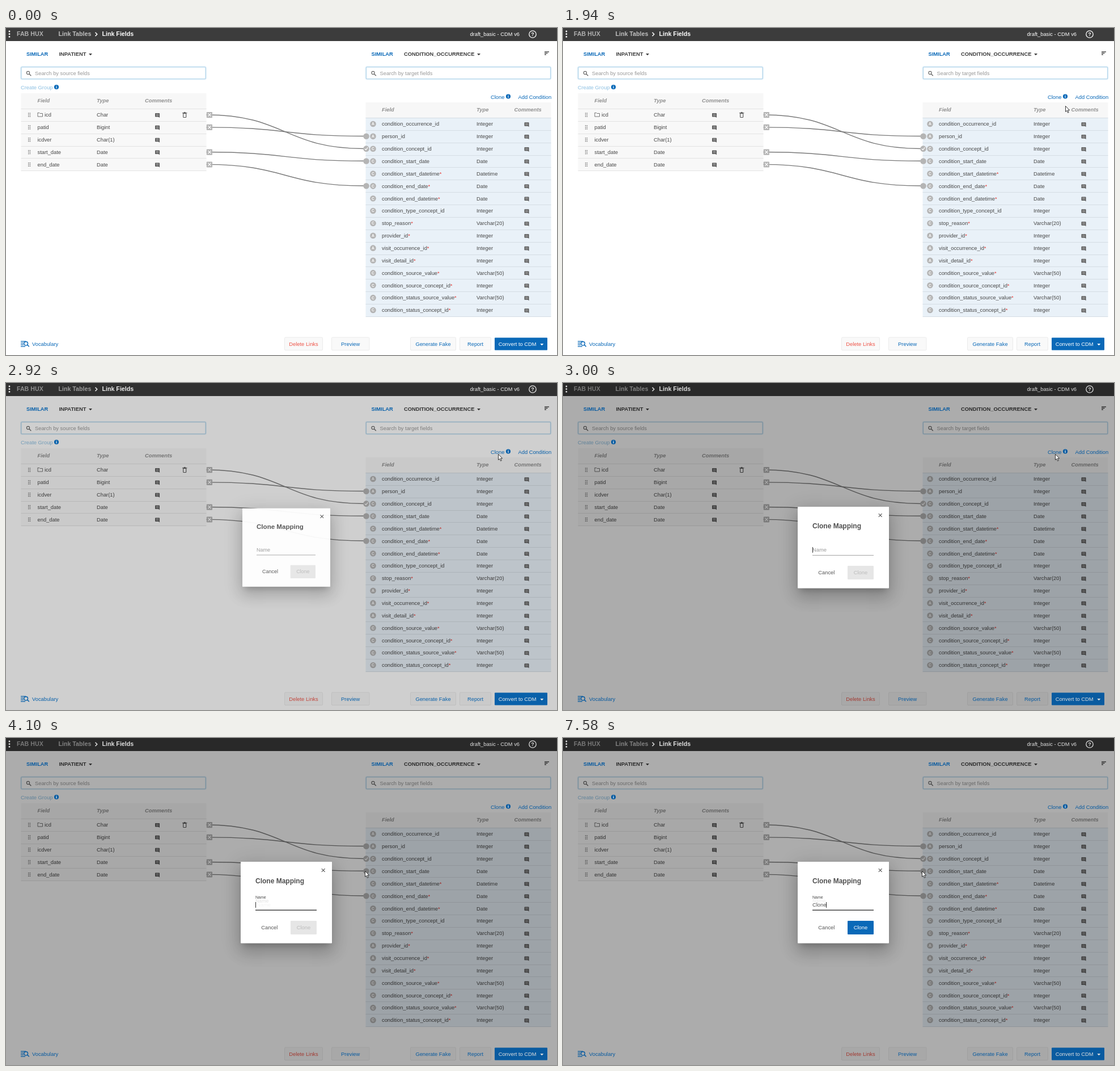
Recreate the animation shown at these times as an HTML page with a canvas. Size 972 px wide and 576 px high, loop 8 s.

```html
<!DOCTYPE html>
<html lang="en">
<head>
<meta charset="utf-8">
<title>Link Fields</title>
<style>
html, body { margin: 0; width: 100%; height: 100%; overflow: hidden; background: #fff; }
canvas { display: block; }
</style>
</head>
<body>
<canvas id="stage" width="972" height="576"></canvas>
<script>
const ctx = document.getElementById('stage').getContext('2d');
const LOOP = 8000;
const BLUE = '#0a69b8', INK = '#484848', GREY = '#b5b5b5', SIZE = 9.33;

const sourceRows = [['icd', 'Char'], ['patid', 'Bigint'], ['icdver', 'Char(1)'],
  ['start_date', 'Date'], ['end_date', 'Date']];
// badge, name (* marks a required field), type
const targetRows = [
  'A condition_occurrence_id Integer', 'A person_id Integer', 'C condition_concept_id Integer',
  'C condition_start_date Date', 'C condition_start_datetime* Datetime', 'C condition_end_date* Date',
  'C condition_end_datetime* Date', 'C condition_type_concept_id Integer', 'C stop_reason* Varchar(20)',
  'A provider_id* Integer', 'A visit_occurrence_id* Integer', 'A visit_detail_id* Integer',
  'C condition_source_value* Varchar(50)', 'C condition_source_concept_id* Integer',
  'C condition_status_source_value* Varchar(50)', 'C condition_status_concept_id* Integer'
].map(row => row.split(' '));
const links = [[0, 2], [1, 1], [3, 3], [4, 5]];
const sourceY = i => 153 + i * 21.85;
const targetY = i => 169 + i * 21.867;

const cursorPath = [[460, 968, 568], [840, 929, 145], [1150, 929, 145], [1940, 886, 137],
  [2000, 886, 137], [2420, 868, 125], [3060, 868, 125], [3490, 705, 200], [3550, 700, 202], [3850, 633, 234]];
// time, dialog scale, dialog opacity, backdrop opacity
const dialogSteps = [[0, 0, 0, 0], [2870, 0.8, 0.4, 0.04], [2920, 0.963, 0.95, 0.19], [3000, 1, 1, 0.325]];
// offset, blur, spread, opacity
const dialogShadows = [[7, 10, -5, 0.2], [16, 25, 2, 0.14], [6, 31, 5, 0.12]];
const typing = [4610, 4980, 5710, 6220, 6520];
const caretOff = [[3550, 4100], [5530, 5710], [7030, 7580]];

const clamp = u => Math.max(0, Math.min(1, u));
const mix = (a, b, u) => a + (b - a) * u;
const smooth = u => u * u * (3 - 2 * u);

function text(s, x, cy, color = INK, style = '', size = SIZE, align = 'left') {
  ctx.font = `${style} ${size}px "Liberation Sans", Arial, sans-serif`;
  ctx.textAlign = align;
  ctx.fillStyle = color;
  ctx.fillText(s, x, Math.round(cy + size * 0.36));
}
function box(x, y, w, h, fill, stroke, radius = 0, width = 1) {
  ctx.beginPath();
  ctx.roundRect(x, y, w, h, radius);
  if (fill) { ctx.fillStyle = fill; ctx.fill(); }
  if (stroke) { ctx.strokeStyle = stroke; ctx.lineWidth = width; ctx.stroke(); }
}
function disc(x, y, r, fill) {
  ctx.beginPath();
  ctx.arc(x, y, r, 0, 7);
  ctx.fillStyle = fill;
  ctx.fill();
}
function ring(x, y, r, color, width) {
  ctx.beginPath();
  ctx.arc(x, y, r, 0, 7);
  ctx.strokeStyle = color;
  ctx.lineWidth = width;
  ctx.stroke();
}
function line(color, width, ...points) {
  ctx.beginPath();
  for (let i = 0; i < points.length; i += 2) ctx.lineTo(points[i], points[i + 1]);
  ctx.strokeStyle = color;
  ctx.lineWidth = width;
  ctx.stroke();
}
function cross(x, y, r, color, width) {
  line(color, width, x - r, y - r, x + r, y + r);
  line(color, width, x - r, y + r, x + r, y - r);
}
function arrowDown(x, y, color) {
  ctx.beginPath();
  ctx.moveTo(x - 3, y); ctx.lineTo(x + 3, y); ctx.lineTo(x, y + 3.2);
  ctx.fillStyle = color;
  ctx.fill();
}
function commentIcon(x, y) {
  box(x - 4, y - 4, 8, 6.5, '#555', null, 0.7);
  ctx.beginPath();
  ctx.moveTo(x + 1.5, y + 2); ctx.lineTo(x + 4, y + 2); ctx.lineTo(x + 4, y + 4);
  ctx.fill();
  for (const dy of [-2, 0.3]) line('#ddd', 0.8, x - 2.6, y + dy, x + 2.6, y + dy);
}
function infoIcon(x, y, color) {
  disc(x, y, 4.1, color);
  ctx.fillStyle = '#fff';
  ctx.fillRect(x - 0.6, y - 2.3, 1.2, 1.1);
  ctx.fillRect(x - 0.6, y - 0.5, 1.2, 2.8);
}
function searchField(x, hint) {
  box(x - 0.5, 68.5, 326, 21.5, '#fff', '#e4f1fa', 2, 2.6);
  box(x - 0.2, 68.8, 325.4, 21, null, '#b0d3e8', 1.5, 1.1);
  ring(x + 12, 79, 2.6, '#666', 1.1);
  line('#666', 1.4, x + 14, 81, x + 17.3, 84.3);
  text(hint, x + 24, 79.5, '#999');
}
function tableHead(x, y, columns) {
  box(x, y, 327, 27, '#f7f7f7');
  ['Field', 'Type', 'Comments'].forEach((s, i) => text(s, columns[i], y + 13, '#909090', 'italic bold'));
}
function tableRows(x, rowY, count, fill, border) {
  const top = i => Math.round(rowY(i) - 11);
  box(x, top(0), 327, top(count) - top(0), fill);
  ctx.fillStyle = border;
  for (let i = 0; i <= count; i++) ctx.fillRect(x, top(i), 327, 1);
}

function drawSource() {
  text('INPATIENT', 93.5, 46, '#3c3c3c', 'bold');
  arrowDown(149, 45, '#3c3c3c');
  searchField(27, 'Search by source fields');
  text('Create Group', 26, 105, '#8dc0e2');
  tableHead(26.5, 115, [55.5, 160, 245]);
  tableRows(26.5, sourceY, sourceRows.length, '#f8f8f8', '#e3e3e3');
  sourceRows.forEach(([name, type], i) => {
    const y = sourceY(i);
    for (let k = 0; k < 6; k++) box(39 + (k % 2) * 2.7, y - 3.5 + (k >> 1) * 2.8, 1.5, 1.5, '#777');
    text(name, i ? 55.5 : 68, y);
    text(type, 160, y);
    commentIcon(267, y + 1);
  });
  ctx.lineJoin = 'round';
  line('#777', 1, 56, 149.5, 59, 149.5, 60, 150.5, 64.5, 150.5, 64.5, 156, 56, 156, 56, 149);
  box(312.7, 150.5, 5, 7, null, '#555', 0.8, 1.1);
  line('#555', 1.1, 311, 149.7, 319.4, 149.7);
  line('#555', 1.1, 313.7, 148.6, 316.7, 148.6);
}

function drawTarget() {
  text('CONDITION_OCCURRENCE', 702, 46, '#3c3c3c', 'bold');
  arrowDown(834, 45, '#3c3c3c');
  [8, 5.5, 3].forEach((w, i) => line('#333', 1.3, 950, 42 + i * 2.4, 950 + w, 42 + i * 2.4));
  searchField(635.5, 'Search by target fields');
  tableHead(634.5, 131, [663, 830, 896.5]);
  tableRows(634.5, targetY, targetRows.length, '#e9f1f8', '#d5dde4');
  targetRows.forEach(([badge, name, type], i) => {
    const y = targetY(i), plain = name.replace('*', '');
    disc(647.5, y, 5.3, GREY);
    text(badge, 647.5, y, '#fff', 'bold', 6.7, 'center');
    text(plain, 663, y);
    if (plain !== name) text('*', 663 + ctx.measureText(plain).width, y, '#e53935');
    text(type, 830, y);
    commentIcon(918.5, y + 1.2);
  });
}

function drawLinks() {
  for (const [from, to] of links) {
    const x1 = 353.5, x2 = 631, mid = (x1 + x2) / 2;
    const y1 = sourceY(from), y2 = targetY(to) - 0.3;
    ctx.beginPath();
    ctx.moveTo(x1, y1);
    ctx.bezierCurveTo(mid, y1, mid, y2, x2, y2);
    ctx.strokeStyle = '#7a7a7a';
    ctx.lineWidth = 1.4;
    ctx.stroke();
    box(353.8, y1 - 5, 10.2, 10.2, GREY, null, 1);
    cross(359, y1, 2.7, '#fff', 1.2);
    disc(635.5, y2 + 0.2, 5.3, GREY);
  }
  const y = targetY(2);
  line('#fff', 1.2, 633, y, 635, y + 2, 638.3, y - 2.3);
}

function drawPage() {
  box(0, 0, 972, 576, '#fff');
  box(0, 0, 972, 23, '#3c3c3c');
  text('FAB HUX', 19, 10.6, '#b0b0b0', 'bold', 10.67);
  text('Link Tables', 92.5, 10.6, '#c0c0c0', 'bold', 10.67);
  drawSource();
  drawTarget();
  drawLinks();
  for (const [x, w] of [[491, 68], [574, 67.5], [713, 81], [800, 56]])
    box(x + 0.5, 545, w - 1, 22.5, '#f9f9f9', '#ebebeb', 1.5);
  text('Delete Links', 525, 557, '#ee5448', '', SIZE, 'center');
}

// Strong colours fade less than the rest of the page under the backdrop.
function drawAccents(dim) {
  const k = 1 - dim * 0.4;
  const shade = (...rgb) => `rgb(${rgb.map(c => Math.round(c * k))})`;
  const white = shade(255, 255, 255), blue = shade(10, 105, 184);
  for (const y of [6, 10.7, 15.4]) disc(6, y, 1.4, white);
  line(white, 1.6, 157.5, 7.8, 160.8, 11, 157.5, 14.2);
  text('Link Fields', 169.5, 10.6, white, 'bold', 10.67);
  text('draft_basic - CDM v6', 906, 10.2, white, '', SIZE, 'right');
  ring(929, 11, 6.2, white, 1.3);
  text('?', 929, 11, white, 'bold', 9, 'center');
  for (const x of [36, 644.5]) text('SIMILAR', x, 46, blue, 'bold');
  infoIcon(89, 104, blue);
  text('Clone', 855, 122, blue);
  infoIcon(886, 120.5, blue);
  text('Add Condition', 903.5, 122, blue);
  [9, 5, 5, 8].forEach((w, i) => line(blue, 1.3, 26, 552 + i * 3, 26 + w, 552 + i * 3));
  ring(35.2, 555.8, 3.3, blue, 1.4);
  line(blue, 1.6, 37.5, 558, 40.8, 561.3);
  text('Vocabulary', 46, 557, blue);
  text('Preview', 607.7, 557, blue, '', SIZE, 'center');
  text('Generate Fake', 753.5, 557, blue, '', SIZE, 'center');
  text('Report', 828, 557, blue, '', SIZE, 'center');
  box(862, 545.5, 93, 22, blue, null, 1);
  text('Convert to CDM', 868.7, 557, white);
  arrowDown(945.3, 556, white);
}

function drawDialogShadow(scale) {
  ctx.save();
  const outside = new Path2D('M0 0H972V576H0Z');
  outside.rect(414, 218, 161, 143.5);
  ctx.clip(outside, 'evenodd');
  for (const [offset, blur, spread, alpha] of dialogShadows) {
    ctx.shadowColor = `rgba(0,0,0,${alpha})`;
    ctx.shadowBlur = blur * scale;
    // The caster sits off stage so that only its shadow is seen.
    ctx.shadowOffsetX = 2000 * scale;
    ctx.shadowOffsetY = offset * scale;
    box(414 - spread - 2000, 218 - spread, 161 + 2 * spread, 143.5 + 2 * spread, '#000');
  }
  ctx.restore();
}

function drawDialog(t, scale, opacity) {
  ctx.save();
  ctx.globalAlpha = opacity;
  ctx.translate(494.5, 289.7);
  ctx.scale(scale, scale);
  ctx.translate(-494.5, -289.7);
  drawDialogShadow(scale);
  box(414, 218, 161, 143.5, '#fff', null, 1);

  cross(559.7, 233, 2.9, '#555', 1.1);
  text('Clone Mapping', 440, 251.5, '#505050', 'bold', 12);

  const float = smooth(clamp((t - 3060) / 340));
  const typed = typing.filter(at => t >= at).length;
  if (float > 0.6) text('Name', 440, 287, typed ? '#ececec' : '#e2e2e2', '', 8.8);
  if (float === 1 && !typed) text('Name', 442, 294, '#f2f2f2');
  text('Name', 440, mix(294, 280.3, float), float > 0.5 ? '#484848' : '#999', '', mix(SIZE, 7, float));
  ctx.fillStyle = '#a5a5a5';
  ctx.fillRect(440, 303, 108, 1);
  ctx.fillStyle = '#444';
  ctx.fillRect(494 - 54 * float, 302.5, 108 * float, 1.5);

  const value = 'Clone'.slice(0, typed);
  text(value, 440, 294, '#555');
  const caretX = Math.floor(440 + ctx.measureText(value).width);
  if (t >= 3000 && !caretOff.some(([a, b]) => t >= a && t < b)) box(caretX, 289, 1, 10, '#333');

  text('Cancel', 450.3, 334, '#555');
  const ready = t >= 4670 ? 1 : t >= 4610 ? 0.5 : 0;
  box(502, 322, 46, 24, '#e6e6e6', null, 1);
  text('Clone', 525, 334, '#bcbcbc', '', SIZE, 'center');
  if (ready) {
    ctx.globalAlpha = ready;
    box(502, 322, 46, 24, BLUE, null, 1);
    text('Clone', 525, 334, '#fff', '', SIZE, 'center');
  }
  ctx.restore();
}

function drawCursor(t) {
  if (t < cursorPath[0][0]) return;
  let i = cursorPath.findIndex(key => key[0] > t);
  if (i < 0) i = cursorPath.length - 1;
  const [t0, x0, y0] = cursorPath[i - 1], [t1, x1, y1] = cursorPath[i];
  const u = smooth(clamp((t - t0) / (t1 - t0)));
  const arrow = new Path2D('M0 0V10L2.3 7.9L4 11.8L5.7 11L4 7.3H7.2Z');
  ctx.save();
  ctx.translate(mix(x0, x1, u) + 0.5, mix(y0, y1, u) + 0.5);
  ctx.fillStyle = '#fff';
  ctx.fill(arrow);
  ctx.strokeStyle = '#222';
  ctx.lineWidth = 0.9;
  ctx.stroke(arrow);
  ctx.restore();
}

function frame(now) {
  const t = now % LOOP;
  const [, scale, opacity, dim] = dialogSteps.filter(step => t >= step[0]).pop();
  drawPage();
  box(0, 0, 972, 576, `rgba(0,0,0,${dim})`);
  drawAccents(dim);
  if (opacity) drawDialog(t, scale, opacity);
  drawCursor(t);
  requestAnimationFrame(frame);
}
requestAnimationFrame(frame);
</script>
</body>
</html>
```
